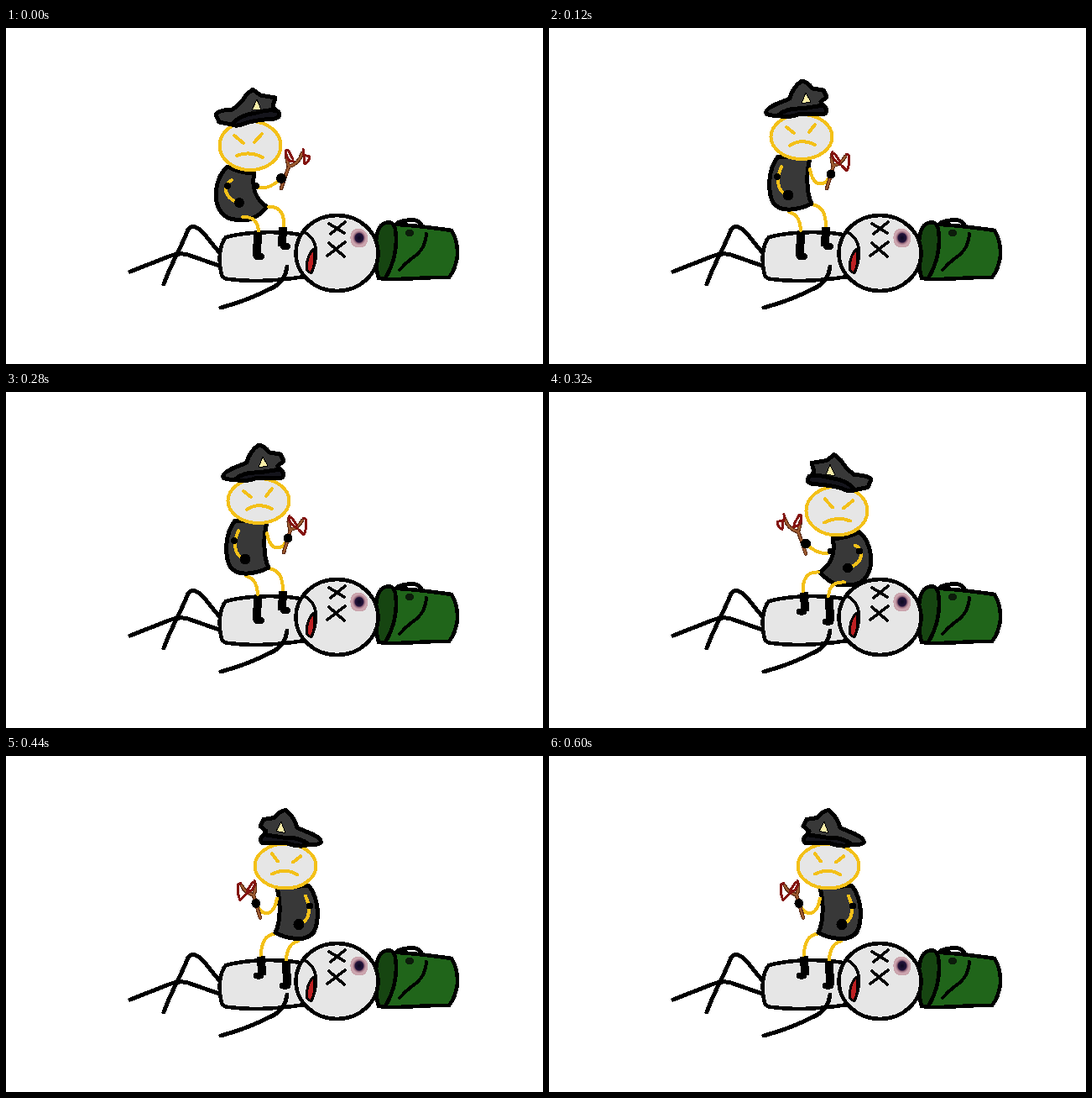
Recreate the animation shown at these times as an HTML page. Size 640 by 400 pixels, loop 640 ms.

```html
<!DOCTYPE html>
<html lang="en">
<head>
<meta charset="utf-8">
<title>Victory bounce</title>
<style>
  html, body { margin: 0; width: 100%; height: 100%; overflow: hidden; background: #fff; }
  svg { display: block; width: 640px; height: 400px; shape-rendering: crispEdges; }
  path, ellipse { stroke-linecap: round; stroke-linejoin: round; }
  .line { fill: none; stroke: #000; stroke-width: 5; }
  .thin { fill: none; stroke: #000; stroke-width: 3.6; }
  .skin { fill: #e6e6e6; stroke: #000; stroke-width: 4.6; }
  .gold { fill: none; stroke: #f3c018; stroke-width: 4; }
  .face { fill: #e6e6e6; stroke: #f3c018; stroke-width: 4; }
  .cloth { fill: #383838; stroke: #000; stroke-width: 5; }
  .brim { fill: #14141b; stroke: #000; stroke-width: 5; }
  .badge { fill: #fbeea8; stroke: #000; stroke-width: 1; }
  .bark { fill: none; stroke: #5b2a14; stroke-width: 4.6; }
  .wood { fill: none; stroke: #9c5a30; stroke-width: 2.4; }
  .band { fill: none; stroke: #84140f; stroke-width: 3; }
  .boot { fill: none; stroke: #000; stroke-width: 10; stroke-linecap: butt; }
  .toe { fill: none; stroke: #000; stroke-width: 8; }
</style>
</head>
<body>
<svg viewBox="0 0 640 400">
  <defs>
    <radialGradient id="wound">
      <stop offset="0" stop-color="#0c0820"/>
      <stop offset=".46" stop-color="#24143c"/>
      <stop offset=".58" stop-color="#96697c"/>
      <stop offset=".78" stop-color="#cda5b0"/>
      <stop offset="1" stop-color="#c9a4ac"/>
    </radialGradient>
  </defs>
  <g id="fallen">
    <path class="line" d="M148 290L194 272Q206 267 217 270L254 283"/>
    <path class="line" d="M188 305C195 284 208 263 217 240Q221 233 231 240C242 250 249 263 259 272"/>
    <path class="skin" d="M354 247C335 242 293 241 262 249C254 258 253 278 257 294Q259 299 266 299C294 303 330 300 356 296"/>
    <path class="line" d="M335 284Q333 300 320 308Q290 324 256 333"/>
    <path fill="#20651a" stroke="#000" stroke-width="4.6" d="M462 234C482 234 510 238 531 241Q539 254 538 271Q536 287 528 297C504 296 475 300 449 299Z"/>
    <path fill="#164511" stroke="#000" stroke-width="4.6" d="M452 232Q462 229 464 240C467 258 463 280 452 298L444 298Q437 268 443 242Q446 234 452 232Z"/>
    <path class="line" d="M467 232Q474 228 488 229Q494 231 496 237"/>
    <path class="line" style="stroke-width:4" d="M501 245Q500 264 484 274Q476 280 469 288"/>
    <ellipse cx="481" cy="244" rx="5.5" ry="4.5" fill="#0c1c0b"/>
    <ellipse class="skin" cx="394.5" cy="268" rx="49" ry="45"/>
    <path class="thin" d="M357 244Q367 249 369 262Q371 276 364 291"/>
    <path fill="#be2022" stroke="#000" stroke-width="3" d="M367 263Q359 269 358 285Q359 292 364 291Q370 279 367 263Z"/>
    <path class="thin" d="M385 233L403 244M387 245L404 231M385 256L403 272M383 271L404 255"/>
    <path fill="url(#wound)" d="M413 241Q420 236 427 241Q433 247 431 254Q429 262 421 261Q412 262 411 254Q409 246 413 241Z"/>
  </g>
  <g id="dancer"></g>
</svg>
<script>
const STEP = 40;
const ORDER = "crouch stand reach stand".split(" ");

const shape = (cls, d) => `<path class="${cls}" d="${d}"/>`;
const oval = (cls, x, y, rx, ry = rx) => `<ellipse class="${cls}" cx="${x}" cy="${y}" rx="${rx}" ry="${ry}"/>`;
const shift = (x, y, art) => `<g transform="translate(${x} ${y})">${art}</g>`;
const sling = (wood, band) => shape("bark", wood) + shape("wood", wood) + shape("band", band);

const crouchSling = sling(
  "M328 191L333 176L337 165Q335 158 334 152M337 165Q349 162 353 149",
  "M334 145Q331 152 338 158L343 159M336 145L342 156M354 144L354 151L362 153Q361 160 356 162L355 152");

const standSling = sling(
  "M331 191L335 178L339 164Q336 158 337 151M339 164Q349 161 353 153",
  "M338 147Q336 153 341 158L348 163M340 149L347 159M354 150L357 151Q359 162 355 170L349 164");

const crouchTop = `
  ${oval("face", 291, 140, 36.5, 29)}
  ${shape("gold", "M272 128L283 137M305 126L296 136M275 152Q290 146 306 154")}
  ${shape("cloth", "M250 103Q252 98 270 97Q281 89 286 80L294 73L303 80L321 83L318 93L323 101Q296 101 284 105L269 115L254 112Z")}
  ${shape("brim", "M269 115Q279 103 298 101Q315 96 324 99Q329 106 320 108Q300 109 286 113Q276 118 269 115Z")}
  ${shape("badge", "M299 85L293 98L304 97Z")}`;

const standTop = `
  ${oval("face", 301, 129.5, 36.5, 26.5)}
  ${shape("gold", "M283 118L292 125M317 115L310 124M287 140Q300 131 317 139")}
  ${shape("cloth", "M259 102Q257 97 270 91L287 84Q290 71 301 63Q308 64 314 72L327 74L331 82L324 88L328 94Q295 94 276 104Q264 105 259 102Z")}
  ${shape("brim", "M273 104Q283 95 301 96L327 92Q333 97 329 102Q314 103 300 102Q283 108 273 104Z")}
  ${shape("badge", "M306 77L301 90L312 88Z")}`;

const standArms = `
  ${shape("gold", "M277 165Q271 179 274 189Q277 196 283 198M311 168Q313 181 320 185Q330 187 333 179")}
  ${oval("", 272, 177, 4)}${oval("", 285, 199, 6.5)}
  ${standSling}${oval("", 336, 174, 5.5)}`;

const boots = shape("boot", "M300 243L299 272M330 237L329 260") +
  shape("toe", "M299 272L304 272M331 260L335 260");

const poses = {
  crouch: `
    ${shape("cloth", "M264 165C250 177 245 205 257 220C266 231 279 228 290 228Q302 224 311 213C298 204 292 190 296 173Q280 173 264 165Z")}
    ${shape("gold", "M282 225Q301 224 301 244M313 213Q333 212 331 238")}
    ${boots}
    ${crouchTop}
    ${shape("gold", "M269 181Q262 184 262 194Q264 203 275 207M299 189Q309 194 325 182")}
    ${oval("", 264, 188, 4)}${oval("", 278, 208, 6)}${oval("", 298, 188, 4)}
    ${crouchSling}${oval("", 328, 179, 6)}`,
  stand: `
    ${shape("gold", "M286 219Q299 222 300 241M313 210Q330 212 330 236")}
    ${boots}
    ${shape("cloth", "M273 153C261 168 260 194 267 208Q274 217 288 216Q302 215 313 209C306 195 307 171 311 155Z")}
    ${standTop}${standArms}`,
  reach: `
    ${shape("gold", "M291 211Q300 219 300 241M316 203Q329 211 330 236")}
    ${boots}
    ${shape("cloth", "M277 143C266 159 265 187 272 201Q279 210 292 209Q306 208 317 202C311 187 311 162 315 145Z")}
    ${shift(4, -9.5, standTop)}${shift(5, -8, standArms)}`
};

// Each pose appears facing right, then mirrored for the second half.
const dancer = document.getElementById("dancer");
dancer.innerHTML = ORDER.slice(0, 3).map(name => `<g>${poses[name]}</g>`).join("");
const layers = [...dancer.children];

function draw(time) {
  const step = Math.floor(time / STEP) % 16;
  const current = ORDER.indexOf(ORDER[step % 4]);
  layers.forEach((layer, i) => layer.setAttribute("display", i === current ? "inline" : "none"));
  dancer.setAttribute("transform", step < 8 ? "" : "translate(634 1.5) scale(-1 1)");
}

const start = performance.now();
function tick() {
  draw(performance.now() - start);
  requestAnimationFrame(tick);
}
tick();
</script>
</body>
</html>
```
